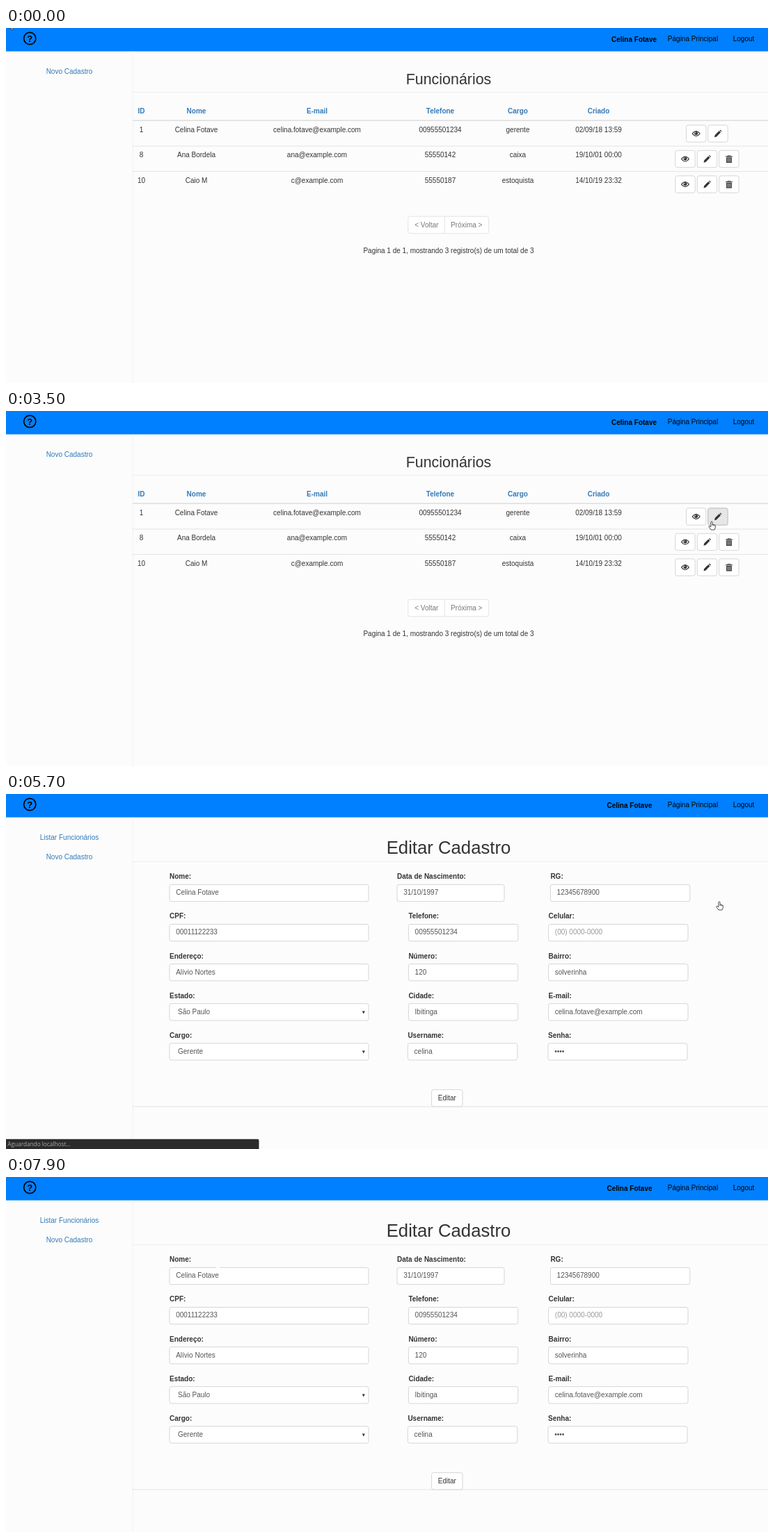
Recreate the animation shown at these times as an HTML page. Size 1095 px wide and 511 px high, loop 8 s.

```html
<!DOCTYPE html>
<html lang="pt-BR">
<head>
<meta charset="utf-8">
<title>Funcionários</title>
<style>
  html, body { margin: 0; width: 100%; height: 100%; overflow: hidden; background: #fcfcfc; }
  svg { display: block; width: 1095px; height: 511px; font: 10px "Liberation Sans", Arial, sans-serif; fill: #333; }
  .mid { text-anchor: middle; }
  .bold { font-weight: bold; }
  .link { fill: #337ab7; }
  .dark { fill: #000; }
  .muted { fill: #777; }
  .value { fill: #555; }
  .hint { fill: #999; }
  .h2 { font-size: 21.43px; }
  .h1 { font-size: 25.71px; }
  .box { fill: #fff; stroke: #ccc; stroke-width: .8; }
  .ui { font: 8.25px "Open Sans", "Noto Sans", sans-serif; }
  .cursor { fill: #fff; stroke: #222; stroke-width: .8; stroke-linejoin: round; }
</style>
</head>
<body>
<svg id="stage" viewBox="0 0 1095 511"></svg>
<script>
const LOOP = 8000, STEP = 100;
const USER = 'Celina Fotave', EMAIL = 'celina.fotave@example.com', PHONE = '00955501234';

const text = (x, y, str, cls = '') => `<text x="${x}" y="${y}" class="${cls}">${str}</text>`;
const mid = (x, y, str, cls = '') => text(x, y, str, 'mid ' + cls);
const rule = (y, color, h = .8) => `<rect x="182" y="${y}" width="913" height="${h}" fill="${color}"/>`;
const box = (x, y, w, h = 24.3, attrs = '') =>
  `<rect x="${x}" y="${y}" width="${w}" height="${h}" rx="2.8" class="box" ${attrs}/>`;

const icons = {
  eye: `<path d="M-5.4 0Q0-7 5.4 0Q0 7-5.4 0Z" fill="none" stroke="#333" stroke-width="1.2"/>
    <circle cy="-.4" r="2.5"/><circle cx="-.9" cy="-1.2" r=".7" fill="#fff"/>`,
  pencil: '<path d="M-5 5.2L-4.2 2L1.8-4L4-1.8L-2 4.4ZM2.5-4.7L3.5-5.5L5.5-3.5L4.7-2.5Z"/>',
  trash: `<path d="M-4.8-3.9H-2V-5.3H2V-3.9H4.8V-2.7H-4.8ZM-3.9-2H3.9V5.4H-3.9Z"/>
    <path d="M-1-4.4H1M-2-1V4.4M0-1V4.4M2-1V4.4" stroke="#fff" stroke-width=".7"/>`
};
const iconButton = (x, y, icon, attrs) =>
  box(x - 14.2, y - 12.2, 28.4, 24.4, attrs) + `<g transform="translate(${x} ${y})">${icons[icon]}</g>`;

function listPage() {
  const columns = [194.5, 273.5, 447, 624, 735.5, 851.5];
  const row = (y, cells, cls) => cells.map((cell, i) => mid(columns[i], y, cell, cls)).join('');
  const people = [
    ['1', USER, EMAIL, PHONE, 'gerente', '02/09/18 13:59'],
    ['8', 'Ana Bordela', 'ana@example.com', '55550142', 'caixa', '19/10/01 00:00'],
    ['10', 'Caio M', 'c@example.com', '55550187', 'estoquista', '14/10/19 23:32']
  ];
  const rows = people.map((person, i) => {
    const y = 152 + i * 36.5;
    const buttons = i
      ? iconButton(976, y, 'eye') + iconButton(1007.5, y, 'pencil') + iconButton(1039, y, 'trash')
      : iconButton(991.7, y, 'eye') + iconButton(1023, y, 'pencil', 'id="edit"');
    return row(y - 2.4, person) + (i ? rule(y - 18.9, '#ddd') : '') + buttons;
  }).join('');
  return mid(902.5, 20, USER, 'bold dark')
    + mid(91, 65.6, 'Novo Cadastro', 'link')
    + mid(636, 81, 'Funcionários', 'h2') + rule(92, '#eee')
    + row(122.6, ['ID', 'Nome', 'E-mail', 'Telefone', 'Cargo', 'Criado'], 'bold link')
    + rule(132.4, '#ddd', 1.4) + rows
    + box(577.8, 271.2, 115.8, 24.5, 'style="stroke:#ddd"')
    + '<path d="M630.4 271.2V295.7" stroke="#ddd" stroke-width=".8"/>'
    + mid(604.3, 286.6, '&lt; Voltar', 'muted') + mid(661.8, 286.6, 'Próxima &gt;', 'muted')
    + mid(636, 324.4, 'Pagina 1 de 1, mostrando 3 registro(s) de um total de 3');
}

function field(x, rowIndex, w, label, value, kind = 'value') {
  const y = 130.4 + rowIndex * 57.1, select = kind === 'select';
  const arrow = `<path d="M${x + w - 9.3} ${y + 10.8}h4.2l-2.1 4z"/>`;
  return text(x, y - 8.1, label + ':', 'bold') + box(x, y, w)
    + text(x + (select ? 12 : 9.2), y + 14.9, value, select ? 'value' : kind) + (select ? arrow : '');
}

function formPage() {
  return mid(896, 20, USER, 'bold dark')
    + mid(91, 65.6, 'Listar Funcionários', 'link') + mid(91, 94.2, 'Novo Cadastro', 'link')
    + mid(636, 86, 'Editar Cadastro', 'h1') + rule(97, '#eee')
    + field(235, 0, 286, 'Nome', USER)
    + field(562, 0, 154, 'Data de Nascimento', '31/10/1997')
    + field(782.4, 0, 200.4, 'RG', '12345678900')
    + field(235, 1, 286, 'CPF', '00011122233')
    + field(578.4, 1, 157.4, 'Telefone', PHONE)
    + field(779.6, 1, 200.4, 'Celular', '(00) 0000-0000', 'hint')
    + field(235, 2, 286, 'Endereço', 'Alívio Nortes')
    + field(578.4, 2, 157.4, 'Número', '120')
    + field(779.6, 2, 200.4, 'Bairro', 'solverinha')
    + field(235, 3, 286, 'Estado', 'São Paulo', 'select')
    + field(578.4, 3, 157.4, 'Cidade', 'Ibitinga')
    + field(779.6, 3, 200.4, 'E-mail', EMAIL)
    + field(235, 4, 286, 'Cargo', 'Gerente', 'select')
    + field(577.4, 4, 157.4, 'Username', 'celina')
    + field(779, 4, 200, 'Senha', '••••')
    + rule(449.6, '#ddd') + box(611.6, 425.6, 44.4) + mid(633.8, 440.8, 'Editar');
}

document.getElementById('stage').innerHTML = `
  <rect width="1095" height="33.6" fill="#0080ff"/>
  <rect x="181.6" y="33.6" width=".8" height="478" fill="#eee"/>
  <circle cx="34.2" cy="15" r="8.6" fill="none" stroke="#000" stroke-width="1.7"/>
  <text x="34.2" y="19.6" class="mid bold dark" style="font-size:13px">?</text>
  ${mid(987, 19, 'Página Principal', 'dark')}${mid(1060, 19, 'Logout', 'dark')}
  <g id="list">${listPage()}</g>
  <g id="form">${formPage()}</g>
  <g id="status">
    <path id="statusBar" fill="#2b2b2b"/>
    <text id="statusText" class="ui" x="2.3" y="507.3" style="fill:#aaa"></text>
  </g>
  <g id="tooltip">
    <path d="M1068 164.4H1034.4V181.6H1068" fill="#fff" stroke="#666" stroke-width=".8"/>
    ${text(1039.3, 176, 'Editar', 'ui value')}
  </g>
  <path id="notch" d="M302 130.4h5" stroke="#fff" stroke-width="1.4"/>
  <path id="arrow" class="cursor" d="M0 0V9.6L2.2 7.6L3.6 11.2L5.2 10.5L3.7 7H6.6Z"/>
  <path id="hand" class="cursor" d="M-1.1 1.3Q0-.8 1.1 1.3V4.6L5.3 5.9V9.4L4.1 12.5H-1L-4 8.3Q-4 6.4-2.6 7.1L-1.1 8.4ZM1.1 4.6V6.6M3.2 5.3V7"/>`;

const ui = {};
document.querySelectorAll('[id]').forEach(el => ui[el.id] = el);

// Pointer path: time, x, y
const path = [
  [300, 5, -8], [400, 140, 180], [500, 290, 272], [600, 397, 202], [700, 397, 202],
  [1200, 675, 199], [1600, 675, 199], [2000, 830, 218], [2200, 893, 211], [2400, 922, 197.5],
  [3000, 1006, 167], [3100, 1006, 162], [3200, 1006, 162], [3300, 1008, 161], [3400, 1008, 161],
  [3600, 1020, 156], [3700, 1020, 156], [4100, 1025, 154.4], [5900, 1025, 154.4],
  [6500, 763, 107], [6600, 763, 107], [6900, 478, 114], [7200, 478, 114],
  [7300, 477, 114], [7400, 477, 114], [7900, 304, 121]
];

function pointerAt(t) {
  const next = path.findIndex(key => key[0] >= t);
  if (next <= 0) return path[next ? path.length - 1 : 0].slice(1);
  const [t0, x0, y0] = path[next - 1], [t1, x1, y1] = path[next];
  const k = (t - t0) / (t1 - t0);
  return [x0 + (x1 - x0) * k, y0 + (y1 - y0) * k];
}

const show = (el, on) => el.style.display = on ? '' : 'none';
const clamp = v => Math.max(0, Math.min(1, v));

function draw() {
  const t = Math.floor(performance.now() % LOOP / STEP) * STEP;
  const within = (from, to) => t >= from && t < to;
  const hand = within(3500, 6000);

  show(ui.list, t < 5700);
  show(ui.form, t >= 5700);

  ui.edit.style.fill = hand ? (t === 4700 ? '#d4d4d4' : '#e6e6e6') : '';
  ui.edit.style.stroke = hand ? (t >= 4700 ? '#8c8c8c' : '#adadad') : '';

  const waiting = t >= 5300;
  show(ui.status, within(3800, 6000));
  ui.statusBar.setAttribute('d', `M0 496.8H${waiting ? 361.5 : 118.5}q2 0 2 2V511H0Z`);
  ui.statusText.textContent = waiting ? 'Aguardando localhost...' : 'localhost/projeto/users/edit/1';
  ui.tooltip.style.opacity = Math.min(clamp((t - 3900) / 200), clamp((4900 - t) / 300));

  const [x, y] = pointerAt(t);
  // The text caret is white, so it only shows where it crosses a border.
  show(ui.arrow, !hand && !within(2000, 2200) && t < 7900);
  show(ui.hand, hand);
  show(ui.notch, t >= 7900);
  for (const el of [ui.arrow, ui.hand]) el.setAttribute('transform', `translate(${x} ${y})`);

  requestAnimationFrame(draw);
}
draw();
</script>
</body>
</html>
```
